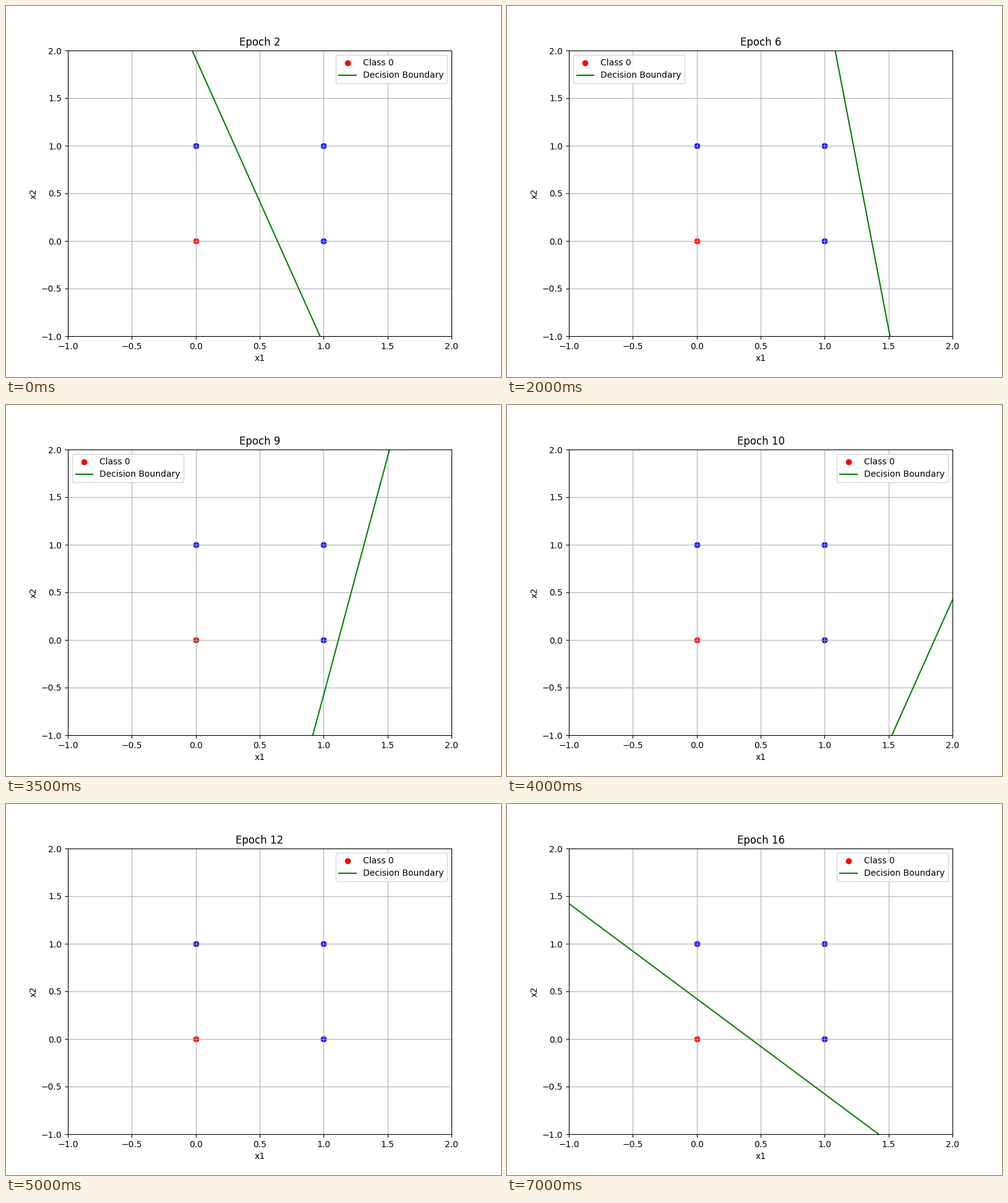
A matplotlib script that plays this animation: 800 px wide and 600 px high, repeating every 7.5 s.

```python
import numpy as np
import matplotlib.pyplot as plt
from matplotlib.animation import FuncAnimation

X = np.array([[0, 0], [0, 1], [1, 0], [1, 1]])
labels = np.array([0, 1, 1, 1])
FIRST_EPOCH, N_EPOCHS = 2, 15


def train(w, b):
    """Perceptron learning of OR; returns the weights after each epoch."""
    w = np.array(w, dtype=float)
    history = []
    for _ in range(N_EPOCHS):
        for x, target in zip(X, labels):
            error = target - int(w @ x + b >= 0)
            w += error * x
            b += error
        history.append((*w, b))
    return history


history = train([-9.5, -4.5], 2.789)

fig, ax = plt.subplots(figsize=(8, 6), dpi=100)
x_line = np.array([-1.0, 2.0])


def update(i):
    w1, w2, b = history[i]
    ax.clear()
    for (px, py), label in zip(X, labels):
        ax.scatter(px, py, color="blue" if label else "red",
                   label=None if label else "Class 0")
    ax.plot(x_line, -(w1 * x_line + b) / w2, color="green",
            label="Decision Boundary")
    ax.set_xlim(-1, 2)
    ax.set_ylim(-1, 2)
    ax.set_xlabel("x1")
    ax.set_ylabel("x2")
    ax.set_title(f"Epoch {FIRST_EPOCH + i}")
    ax.legend(loc="best")
    ax.grid(True)


anim = FuncAnimation(fig, update, frames=N_EPOCHS, interval=500,
                     init_func=lambda: None, repeat=True, repeat_delay=0)
plt.show()
```
